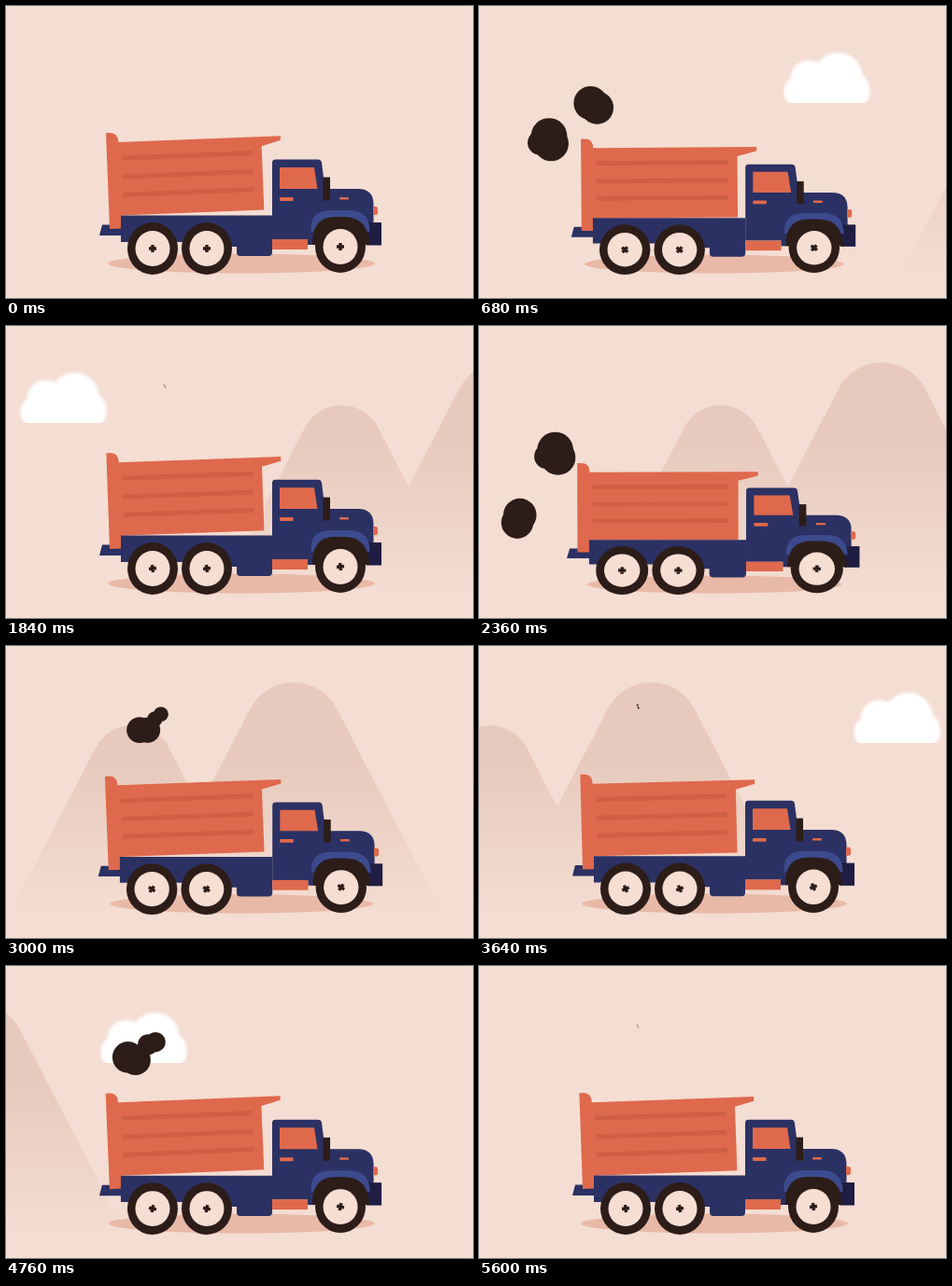
An HTML page that plays this animation: 500x313 px, repeating every 5.64 s.

```html
<!DOCTYPE html>
<html>
<head>
<meta charset="utf-8">
<title>Dump truck</title>
<style>
  html, body { margin: 0; width: 100%; height: 100%; overflow: hidden; background: #f4ddd3; }
  svg { display: block; width: 100vw; height: 100vh; }
  .navy { fill: #2b3163; }
  .orange { fill: #df694c; }
  .dark { fill: #2d1d19; }
</style>
</head>
<body>
<svg viewBox="0 0 500 313" preserveAspectRatio="none">
  <defs>
    <linearGradient id="fade" gradientUnits="userSpaceOnUse" x1="0" y1="125" x2="0" y2="288">
      <stop offset="0" stop-color="#e7cabd"/>
      <stop offset="1" stop-color="#e7cabd" stop-opacity="0"/>
    </linearGradient>
    <filter id="soft" x="-20%" y="-20%" width="140%" height="140%"><feGaussianBlur stdDeviation="1.6"/></filter>
    <clipPath id="flat"><rect x="-70" y="30" width="140" height="74"/></clipPath>
    <g id="cloud" clip-path="url(#flat)">
      <g fill="#fff" filter="url(#soft)">
        <rect x="-46" y="76" width="92" height="32" rx="15"/>
        <circle cx="12" cy="76" r="26"/>
        <circle cx="-19" cy="78" r="20"/>
        <circle cx="31" cy="87" r="14"/>
      </g>
    </g>
    <g id="wheel">
      <ellipse class="dark" rx="27" ry="28"/>
      <ellipse rx="18.5" ry="19" fill="#f6ded3"/>
      <path class="hub" d="M-4 0H4M0 -4V4" stroke="#2d1d19" stroke-width="3.4"/>
    </g>
  </defs>

  <g id="hills"><path id="range" fill="url(#fade)"/></g>
  <use class="cloud" href="#cloud"/>
  <use class="cloud" href="#cloud"/>
  <g id="smoke" class="dark"></g>
  <ellipse id="shadow" cx="252" fill="#e8b9a6"/>

  <g id="truck">
    <path class="navy" d="M103 234.5H124V246H100Z"/>
    <g id="bed">
      <path class="orange" d="M111 136H115Q124 136 124 146.4H297.5V151L277 156.5V225H124V239H111Z"/>
      <path d="M127 163.5H267M127 183.5H267M127 202.8H267" stroke="#cf5f45" stroke-width="5"/>
    </g>
    <path class="navy" d="M123 224.5H285V264Q285 268 281 268H251Q247 268 247 264V258H190V253H123Z"/>
    <path class="navy" d="M285 168Q285 164.5 288.5 164.5H334Q337.5 164.5 338 168L341.500 196H377Q393.500 196 393.500 213V250H285Z"/>
    <rect class="orange" x="285" y="250" width="38" height="11"/>
    <path class="navy" d="M323 240H332V256H323Z"/>
    <rect x="386" y="232" width="16" height="24.500" fill="#1f1d42"/>
    <path d="M326.500 242V238Q326.500 219 348 219H367Q389.500 219 389.500 242Z" fill="#3c4a8e"/>
    <path class="dark" d="M328 256V250Q330 226 352 226H362Q388 226 389 256Z"/>
    <path class="orange" d="M293 173H330L333.500 196H293Z"/>
    <rect class="orange" x="293" y="205" width="14.500" height="4" rx="1"/>
    <rect class="orange" x="357" y="205" width="10" height="2.500" rx="1"/>
    <path class="orange" d="M393 215H396Q398 215 398 218V221Q398 224 396 224H393Z"/>
    <rect class="dark" x="339.500" y="183.500" width="7.500" height="25"/>
    <use href="#wheel" x="157" y="260"/>
    <use href="#wheel" x="215" y="260"/>
    <use href="#wheel" x="358" y="258"/>
  </g>
</svg>
<script>
const LOOP = 5640, BEAT = 940, PUFF = 1880;
const $ = id => document.getElementById(id);
const set = (el, attrs) => { for (const k in attrs) el.setAttribute(k, attrs[k]); };
const clouds = document.querySelectorAll('.cloud');
const hub = document.querySelector('.hub');

// Straight-sided hill with a round top
function hill(x, top, r) {
  const dx = r * .888, y = top + r * .54, foot = dx + (300 - y) / 1.93;
  return `M${x - foot} 300L${x - dx} ${y}A${r} ${r} 0 0 1 ${x + dx} ${y}L${x + foot} 300Z`;
}
$('range').setAttribute('d', hill(0, 85, 44) + hill(172.5, 39, 52));

// Smoke path, one knot every 200 ms: x, y, radius
const KNOTS = [
  [104, 246, 0], [43, 221, 16], [66, 156, 19], [110, 116, 19], [138, 97, 16.2],
  [156, 83, 11], [165.5, 72, 6.5], [170, 66.5, 2.3], [170, 64.5, .6], [170, 64, 0]
];
function along(s) {
  const i = Math.floor(s / 200), u = s / 200 - i;
  const at = j => KNOTS[Math.max(0, Math.min(KNOTS.length - 1, j))];
  return [0, 1, 2].map(k => {
    const [a, b, c, d] = [at(i - 1)[k], at(i)[k], at(i + 1)[k], at(i + 2)[k]];
    return .5 * (2 * b + (c - a) * u + (2 * a - 5 * b + 4 * c - d) * u * u + (3 * b - a - 3 * c + d) * u ** 3);
  });
}

const blobs = Array.from({ length: 6 }, () =>
  $('smoke').appendChild(document.createElementNS('http://www.w3.org/2000/svg', 'circle')));

function puff(parts, s) {
  if (s <= 0 || s > 1660) return parts.forEach(p => set(p, { r: 0 }));
  const [x, y, raw] = along(s), r = Math.max(0, raw);
  const turn = (70 - (s - 480) * .17) * Math.PI / 180;
  const gap = Math.min(8.5, 1.5 + 2 * r) / 2;
  const dx = Math.cos(turn) * gap, dy = Math.sin(turn) * gap;
  const side = Math.exp(-(((s - 460) / 150) ** 2));
  set(parts[0], { cx: x - dx, cy: y - dy, r });
  set(parts[1], { cx: x + dx, cy: y + dy, r: r * .97 });
  set(parts[2], { cx: x - 11 * side, cy: y + 3 * side, r: r * .68 });
}

// 0 at the top of the bounce, 1 at the bottom
const dip = (t, degrees) => (1 - Math.cos(t / BEAT * 2 * Math.PI + degrees * Math.PI / 180)) / 2;

function draw(t) {
  const low = dip(t, 0), wide = dip(t, 15) ** 2, tilt = 1 - dip(t, -32);
  set($('truck'), { transform: `translate(258 288) scale(${1 + .04 * wide} ${1 - .073 * low}) translate(-258 -288)` });
  set($('bed'), { transform: `rotate(${-2.4 * tilt} 111 239)` });
  set($('shadow'), { cy: 276 + low, rx: 143 - 7 * low, ry: 10.5 - low });
  set(hub, { transform: `rotate(${t / 1880 * 360})` });

  set($('hills'), { transform: `translate(${714.5 - t * .193} 0)` });
  set(clouds[0], { x: 555 - t * .268 });
  set(clouds[1], { x: 448 - (t - 3640) * .268 });

  const age = t % PUFF;
  puff(blobs.slice(0, 3), age);
  puff(blobs.slice(3), age - 230);
}

function tick() {
  draw(performance.now() % LOOP);
  requestAnimationFrame(tick);
}
tick();
</script>
</body>
</html>
```
